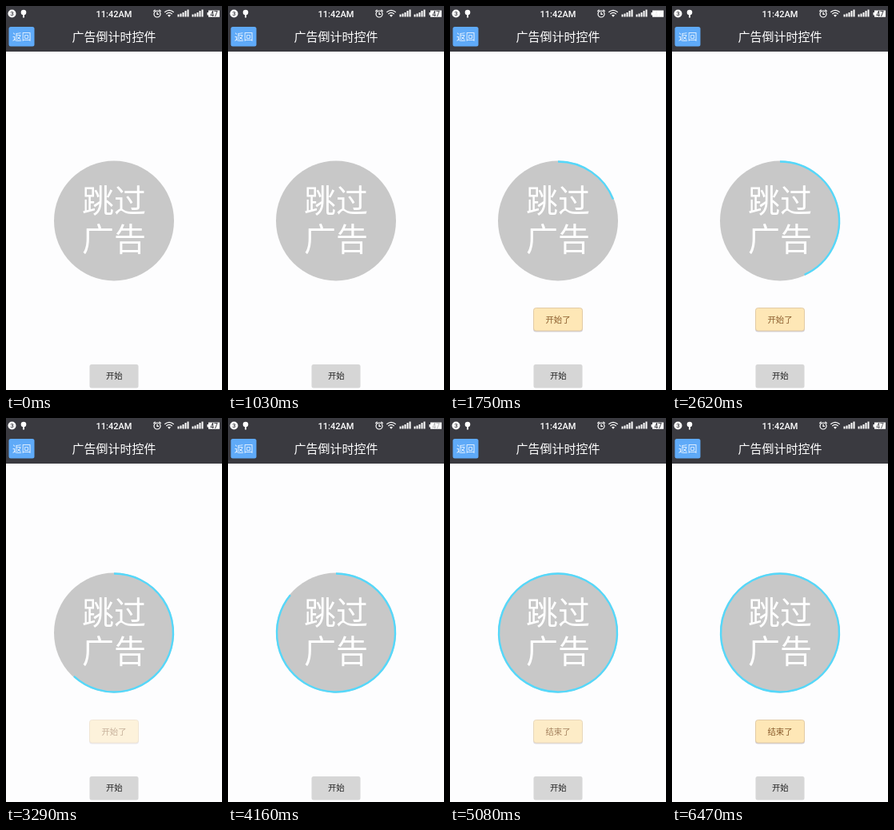
Recreate the animation shown at these times as an HTML page. Size 270x480 px, loop 6520 ms.

```html
<!DOCTYPE html>
<html lang="zh-CN">
<head>
<meta charset="utf-8">
<style>
html, body { margin: 0; width: 100%; height: 100%; overflow: hidden; background: #fdfdfe; }
svg { display: block; width: 100vw; height: 100vh; }
text { font-family: "Noto Sans CJK SC", "Noto Sans CJK", sans-serif; text-anchor: middle; }
.status { font-family: Roboto, sans-serif; font-weight: 500; }
</style>
</head>
<body>
<svg viewBox="0 0 270 480">
  <defs>
    <g id="bars" fill="#fff">
      <rect y="10.5" width="2" height="3"/>
      <rect x="3" y="9.5" width="2" height="4"/>
      <rect x="6" y="8" width="2" height="5.5"/>
      <rect x="9" y="6" width="2" height="7.5"/>
      <rect x="12" y="4.5" width="2" height="9"/>
    </g>
  </defs>
  <rect width="270" height="480" fill="#fdfdfe"/>
  <rect width="270" height="57" fill="#3a3a40"/>

  <!-- status bar -->
  <circle cx="7.5" cy="9.5" r="5" fill="#fff"/>
  <text class="status" x="7.5" y="12.4" font-size="8" fill="#3a3a40">3</text>
  <circle cx="22" cy="8" r="3.3" fill="#fff"/>
  <path d="M22 10V14.5" stroke="#fff" stroke-width="2"/>
  <text class="status" x="135" y="13.6" font-size="11" fill="#fff">11:42AM</text>
  <g fill="none" stroke="#fff" stroke-width="1.2">
    <circle cx="189" cy="10" r="4"/>
    <path d="M189 7.5V10.3H191M184.3 6.8L186.6 4.8M193.7 6.8L191.4 4.8"/>
    <path d="M198.3 7.8Q204 3 209.7 7.8M200.3 10Q204 6.8 207.7 10"/>
  </g>
  <path d="M202 11.6Q204 10 206 11.6L204 13.8Z" fill="#fff"/>
  <use href="#bars" x="214.5"/>
  <use href="#bars" x="232.5"/>
  <path d="M251.5 8H253V5.5H267V13.8H253V11.5H251.5Z" fill="#fff"/>
  <text id="charge" class="status" x="260" y="12.7" font-size="8.5" fill="#3a3a40">47</text>

  <!-- title bar -->
  <rect x="3.5" y="26" width="32" height="24.5" rx="2.5" fill="#5faaf8"/>
  <text x="19.7" y="42.5" font-size="11.7" fill="#eef6ff">返回</text>
  <text x="135" y="44.1" font-size="15" fill="#fff">广告倒计时控件</text>

  <!-- countdown -->
  <circle cx="135" cy="268.5" r="75" fill="#c8c8c8"/>
  <path id="arc" fill="none" stroke="#55d8fa" stroke-width="2.4"/>
  <g font-size="40" fill="#fff">
    <text x="135" y="257.8">跳过</text>
    <text x="135" y="305.8">广告</text>
  </g>

  <g id="toast">
    <rect x="104" y="378.5" width="62" height="29" rx="3.5" fill="#b8b4c4" opacity=".6"/>
    <rect x="104.5" y="377.5" width="61" height="28.5" rx="3" fill="#fee7b6" stroke="#e2cba6"/>
    <text id="note" x="135" y="395.6" font-size="10.4" fill="#8a5c2c"></text>
  </g>

  <rect x="104.5" y="448" width="61" height="29.5" rx="2.5" fill="#d6d6d6"/>
  <text x="135.3" y="465.8" font-size="10.4" fill="#222">开始</text>
</svg>
<script>
const LOOP = 6520, START = 1065, SWEEP = 3600;
const PULSE = 2620, PULSE_START = 820, HALF_PULSE = 900;
const byId = id => document.getElementById(id);
const ramp = (t, from, to) => Math.min(1, Math.max(0, (t - from) / (to - from)));
const set = (id, name, value) => byId(id).setAttribute(name, value);

function arcPath(part) {
  if (part <= 0) return '';
  const r = 74;
  const a = Math.min(part, 0.9999) * 2 * Math.PI;
  const x = 135 + r * Math.sin(a), y = 268.5 - r * Math.cos(a);
  return `M135 ${268.5 - r}A${r} ${r} 0 ${part > 0.5 ? 1 : 0} 1 ${x} ${y}${part >= 1 ? 'Z' : ''}`;
}

// The battery level dims and returns, then rests until the next pulse.
function chargeAlpha(t) {
  const phase = (t - PULSE_START + PULSE) % PULSE;
  const dim = Math.max(0, 1 - Math.abs(phase / HALF_PULSE - 1));
  return 1 - dim * dim;
}

function draw(t) {
  set('arc', 'd', arcPath(ramp(t, START, START + SWEEP)));
  set('charge', 'opacity', chargeAlpha(t));
  const ended = t > 4200;
  byId('note').textContent = ended ? '结束了' : '开始了';
  const alpha = ended
    ? ramp(t, 4720, 5200)
    : ramp(t, 1120, 1600) * (1 - ramp(t, 3080, 3480));
  set('toast', 'opacity', alpha);
}

const begin = performance.now();
function tick() {
  draw((performance.now() - begin) % LOOP);
  requestAnimationFrame(tick);
}
tick();
</script>
</body>
</html>
```
